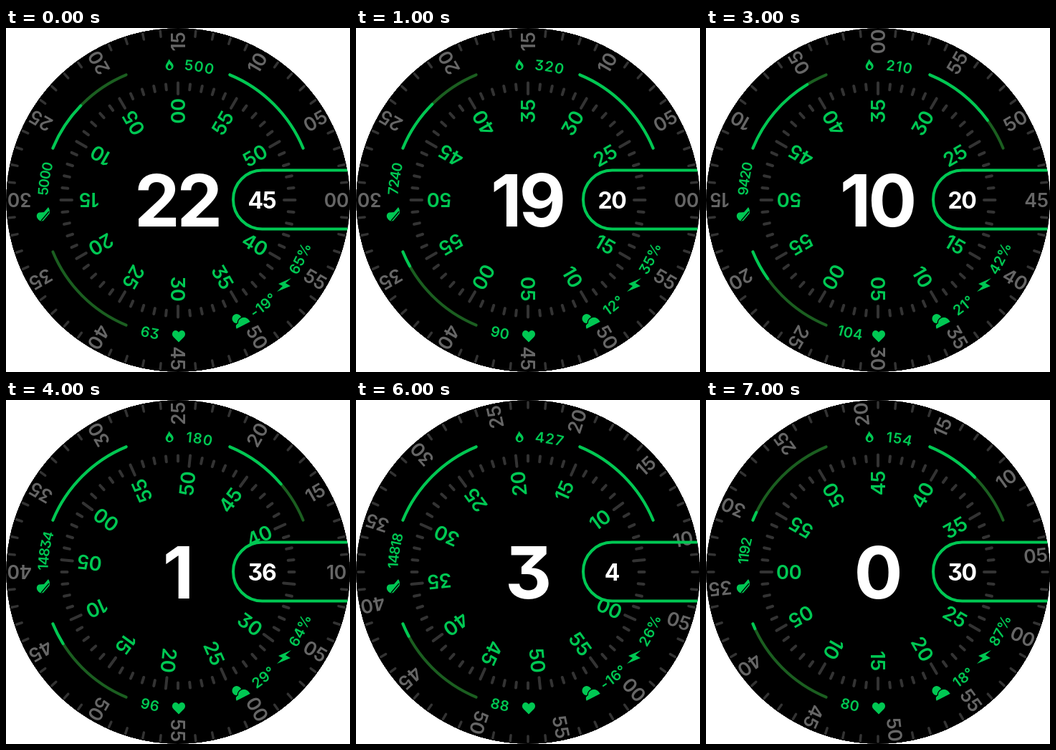
An HTML page for the animation above (8000 ms loop, 480 px wide and 480 px high).

```html
<!DOCTYPE html>
<html lang="en">
<head>
<meta charset="utf-8">
<title>Watch face</title>
<style>
  html, body { margin: 0; width: 100%; height: 100%; overflow: hidden; background: #fff; }
  svg { display: block; width: 100vw; height: 100vh; }
  text {
    font-family: Inter, "Open Sans", sans-serif; font-weight: 600; text-anchor: middle;
    font-feature-settings: "cv09"; letter-spacing: -0.01em;
  }
  .data text { font-size: 20px; fill: #00c853; letter-spacing: 0.8px; }
  .data #steps { font-size: 19.5px; letter-spacing: -1.5px; }
  .line { fill: none; stroke-width: 4; stroke-linecap: round; }
  .icons { fill: #00c853; }
  .cut { fill: none; stroke: #000; stroke-width: 1.3; }
  .time { fill: #fff; }
  .time text { font-weight: 700; letter-spacing: -0.04em; }
</style>
</head>
<body>
<svg viewBox="-240 -240 480 480">
  <defs>
    <clipPath id="dial"><circle r="240" shape-rendering="crispEdges"/></clipPath>
  </defs>
  <g clip-path="url(#dial)">
    <circle r="240" shape-rendering="crispEdges"/>
    <g id="minuteLabels"></g>
    <path d="M250 -41H117.5A40.5 41 0 0 0 117.5 41H250Z"/>
    <g id="minuteTicks"></g>
    <g id="secondRing"></g>
    <path class="line" stroke="#00c853" d="M250 -41.5H117.5A40.5 41 0 0 0 117.5 40.5H250"/>
    <g id="gauges"></g>
    <g class="data" id="data"></g>
    <g class="icons">
      <g transform="translate(-12 -189) rotate(-4)">
        <path d="M0 -8C1 -4 5.5 -2 5.5 2.5A5.5 5.5 0 0 1 -5.5 2.5C-5.5 -1 -1 -4 0 -8Z"/>
        <path fill="#000" d="M0 -1C1 1 2.5 1.5 2.5 3.5A2.5 2.5 0 0 1 -2.5 3.5C-2.5 1.5 -1 1 0 -1Z"/>
      </g>
      <path transform="translate(1 190)" d="M0 8.5L-7.5 1C-11 -3 -8 -8 -4.5 -8C-2 -8 -.7 -6.5 0 -5.2C.7 -6.5 2 -8 4.5 -8C8 -8 11 -3 7.5 1Z"/>
      <path transform="translate(148 118)" d="M10 -9L-8 -1L-2 2L-10 10L9 2L2 -2Z"/>
      <g transform="translate(86 168) rotate(-27)">
        <circle cx="-2.5" cy="-4" r="6.5"/>
        <path stroke="#000" stroke-width="1.2" d="M-10 9C-10 4 -7 2 -4 2C-2 -4 12 -6 13 9Z"/>
      </g>
      <g transform="translate(-188 20)">
        <path d="M7 -10Q10 -6 8.5 -1L0 9Q-6 11 -9 4Q-10 -1 -6 -2.5L1 -3Z"/>
        <path class="cut" d="M8 -4L-3 9"/>
      </g>
    </g>
    <g class="time">
      <text id="hour" x="-1.5" y="37" font-size="101"></text>
      <text id="minute" x="117" y="12" font-size="32"></text>
    </g>
  </g>
</svg>
<script>
const NS = "http://www.w3.org/2000/svg";
const el = id => document.getElementById(id);

function add(parent, tag, attrs, text) {
  const node = document.createElementNS(NS, tag);
  for (const key in attrs) node.setAttribute(key, attrs[key]);
  if (text) node.textContent = text;
  parent.appendChild(node);
  return node;
}

function point(r, deg) {
  const a = deg * Math.PI / 180;
  return (r * Math.cos(a)).toFixed(2) + " " + (r * Math.sin(a)).toFixed(2);
}

function arc(r, from, to) {
  return `M${point(r, from)}A${r} ${r} 0 0 ${to > from ? 1 : 0} ${point(r, to)}`;
}

// Values run counter-clockwise, six degrees apiece, from three o'clock.
function labels(parent, r, size, fill) {
  for (let v = 0; v < 60; v += 5) {
    add(parent, "text", {
      transform: `rotate(${-v * 6}) translate(${r} ${size * 0.364})`,
      "font-size": size, fill
    }, String(v).padStart(2, "0"));
  }
}

function ticks(parent, span, width) {
  for (let v = 0; v < 60; v++) {
    const range = span(v % 5 === 0);
    if (!range) continue;
    add(parent, "line", {
      x1: range[0], x2: range[1], transform: `rotate(${v * 6})`,
      stroke: "#333", "stroke-width": width, "stroke-linecap": "round"
    });
  }
}

function gauge(from, to) {
  const d = arc(189, from, to), box = el("gauges");
  add(box, "path", { d, class: "line", stroke: "#1b5e20" });
  const bar = add(box, "path", { d, class: "line", stroke: "#00c853", pathLength: 100 });
  return p => {
    p = Math.max(0, Math.min(1, p));
    bar.style.display = p ? "" : "none";
    bar.setAttribute("stroke-dasharray", `${p * 100} 200`);
  };
}

function curvedText(id, deg, dir) {
  const r = dir > 0 ? 181.5 : 196.5;
  add(el("data"), "path", { id: id + "Arc", d: arc(r, deg - 30 * dir, deg + 30 * dir), fill: "none" });
  const text = add(el("data"), "text", { id });
  return add(text, "textPath", { href: `#${id}Arc`, startOffset: "50%" });
}

labels(el("minuteLabels"), 124, 27.5, "#00c853");
ticks(el("minuteTicks"), major => major ? [148, 163.5] : [154.5, 162.5], 4);
labels(el("secondRing"), 221, 26.5, "#666");
ticks(el("secondRing"), major => major ? null : [229, 237], 3.5);

const stepBar = gauge(202.5, 247.5);
const calBar = gauge(-67.5, -22.5);
const heartBar = gauge(157.5, 112.5);

const calText = curvedText("calories", -80.8, 1);
const stepText = curvedText("steps", 188.9, 1);
const heartText = curvedText("heart", 101.8, -1);
const powerText = curvedText("power", 25.5, -1);
const tempText = curvedText("temp", 50.9, -1);

// hour, minute, second, calories, steps, step progress, pulse, battery, temperature
const states = [
  [22, 45, 0, 500, 5000, 0.48, 63, 65, -19],
  [19, 20, 0, 320, 7240, 0.5, 90, 35, 12],
  [16, 2, 45, 270, 8960, 0.6, 112, 4, 16],
  [10, 20, 45, 210, 9420, 0.8, 104, 42, 21],
  [1, 36, 10, 180, 14834, 1, 96, 64, 29],
  [23, 34, 23, 2, 3319, 1, 156, 46, 13],
  [3, 4, 8, 427, 14818, 1, 88, 26, -16],
  [0, 30, 4, 154, 1192, 0.08, 80, 87, 18]
];

function turn(id, value) {
  el(id).setAttribute("transform", `rotate(${value * 6})`);
}

function show([hour, minute, second, cal, steps, progress, pulse, power, temp]) {
  el("hour").textContent = hour;
  el("minute").textContent = minute;
  turn("minuteLabels", minute);
  turn("minuteTicks", minute);
  turn("secondRing", second);
  calText.textContent = cal;
  stepText.textContent = steps;
  heartText.textContent = pulse;
  powerText.textContent = power + "%";
  tempText.textContent = temp + "°";
  calBar(cal / 300);
  stepBar(progress);
  heartBar((pulse - 75) / 100);
}

let shown = -1;
const start = performance.now();

function tick() {
  const i = Math.floor((performance.now() - start) / 1000) % states.length;
  if (i !== shown) show(states[shown = i]);
  requestAnimationFrame(tick);
}
tick();
</script>
</body>
</html>
```
